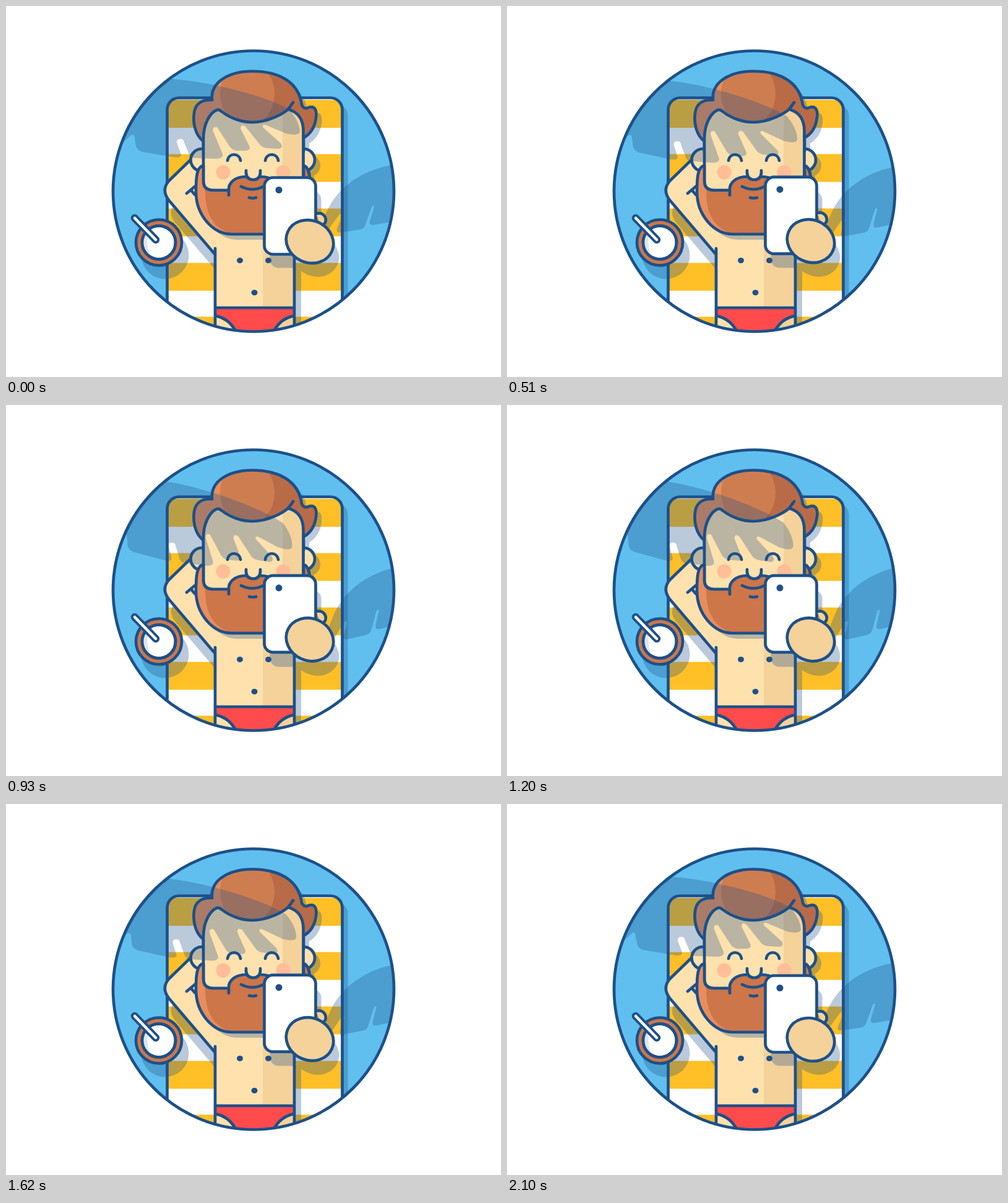
Write an HTML page that moves like this. It is 800 px wide and 600 px high and loops after 2130 ms.

```html
<!DOCTYPE html>
<html lang="en">
<head>
<meta charset="utf-8">
<title>Sunbathing selfie</title>
<style>
  html, body { margin: 0; width: 100%; height: 100%; overflow: hidden; background: #fff; }
  svg { display: block; width: 800px; height: 600px; }
  .line { fill: none; stroke: #1d5089; stroke-width: 4.7; stroke-linecap: round; stroke-linejoin: round; }
  .ink { fill: #1d5089; }
  .shade { fill: #1d5089; opacity: .3; }
  .skin { fill: #fee1ad; }
  .tan { fill: #f4d29a; }
</style>
</head>
<body>
<svg viewBox="0 0 800 600">
  <defs>
    <circle id="disc" cx="400" cy="299.500" r="227"/>
    <rect id="towel" x="260.500" y="148.500" width="283" height="440" rx="19"/>
    <path id="arm" d="M299 248L264 282Q250 297 263 314L338 402V360L310 250Z"/>
    <path id="torso" d="M338 345H466V540H338Z"/>
    <path id="hair" d="M333 152C330 123 360 105.500 398 105.500C440 105.500 473 122 478 160Q482 168 489 164C501 161 503 171 500.500 184C498 198 490 208 481 213V235H319V219C305 208 302 188 304 173C306 157 318 151 333 152Z"/>
    <path id="face" d="M319 283V215C319 190 330 172 341 168Q345 167 349 171C362 181 380 188 398 188C424 188 448 174 456 167Q480.500 174 480.500 202V283Q480 298 465 298H335Q319 298 319 283Z"/>
    <path id="beard" d="M319 258C308 260 307 278 307 300C307 338 334 369 365 369H435C466 369 492 338 492 300C492 276 490 260 481 258V283Q481 298 465 298H441C440 284 428 276 411 276H388C370 276 359 286 360 298H335Q319 298 319 283Z"/>
    <g id="ears"><circle cx="316.500" cy="249" r="18"/><circle cx="481" cy="249" r="18"/></g>
    <rect id="phone" x="417.500" y="277.500" width="83" height="124" rx="14"/>
    <ellipse id="hand" cx="491" cy="381" rx="39" ry="34" transform="rotate(24 491 381)"/>
    <g id="cast">
      <use href="#hair" x="9" y="9"/><use href="#beard" x="9" y="9"/><use href="#ears" x="9" y="9"/>
      <use href="#phone" x="9" y="22"/><use href="#hand" x="9" y="22"/>
    </g>
    <clipPath id="inDisc"><use href="#disc"/></clipPath>
    <clipPath id="inTowel"><use href="#towel"/></clipPath>
    <clipPath id="inTorso"><use href="#torso"/></clipPath>
    <clipPath id="inFace"><use href="#face"/></clipPath>
    <clipPath id="inHair"><use href="#hair"/></clipPath>
    <clipPath id="inBeard"><use href="#beard"/></clipPath>
    <clipPath id="inCup"><circle cx="247" cy="382.500" r="27"/></clipPath>
  </defs>

  <use href="#disc" fill="#60bfee"/>
  <g clip-path="url(#inDisc)">
    <!-- towel -->
    <use href="#towel" class="shade" x="9" y="10"/>
    <g clip-path="url(#inTowel)">
      <path fill="#fff" d="M250 140H560V540H250Z"/>
      <path stroke="#ffbf26" stroke-width="45" d="M250 174.500H560M250 262H560M250 350H560M250 438H560M250 525H560"/>
    </g>
    <use href="#towel" class="line"/>
    <g class="shade">
      <use href="#cast"/>
      <use href="#arm" x="10" y="36"/>
      <path d="M466 400H477V540H466Z"/>
      <circle cx="257" cy="403" r="38.500"/>
    </g>

    <!-- body -->
    <use href="#torso" class="skin"/>
    <g clip-path="url(#inTorso)">
      <path class="tan" d="M415 340H470V540H415Z"/>
      <use href="#cast" class="shade"/>
      <path fill="#ff4b4b" d="M338 488H466V540H338Z"/>
      <g class="line">
        <path class="skin" d="M330 500Q362 502 374 532H330Z"/>
        <path class="tan" d="M474 500Q442 502 430 532H474Z"/>
        <path d="M338 488H466"/>
      </g>
    </g>
    <use href="#arm" class="skin"/>
    <path class="line" d="M299 248L264 282Q250 297 263 314L338 402M338 392V540M466 392V540M292 303L305 292M299 298L305 305"/>
    <g class="ink">
      <ellipse cx="378" cy="411.500" rx="5" ry="4.500"/>
      <ellipse cx="424" cy="411.500" rx="5" ry="4.500"/>
      <ellipse cx="401.500" cy="463.500" rx="5" ry="4.500"/>
    </g>

    <!-- head -->
    <use href="#ears" class="skin"/>
    <use href="#ears" class="line"/>
    <g clip-path="url(#inHair)">
      <path fill="#b96b47" d="M390 90H510V240H390Z"/>
      <path fill="#e88d5c" d="M290 90H390V240H290Z"/>
      <ellipse cx="390" cy="142" rx="44" ry="52" fill="#ce7d50"/>
    </g>
    <use href="#hair" class="line"/>
    <use href="#face" class="skin"/>
    <path class="tan" clip-path="url(#inFace)" d="M447 150H490V310H447Z"/>
    <g fill="#ffbd98"><circle cx="351" cy="269" r="11.500"/><circle cx="448" cy="269" r="11.500"/></g>
    <use href="#face" class="line"/>
    <g clip-path="url(#inBeard)">
      <path fill="#e88d5c" d="M300 250H500V380H300Z"/>
      <path fill="#cc764a" d="M322 250V300C322 345 342 366 378 372H500V250Z"/>
    </g>
    <use href="#beard" class="line"/>
    <path class="skin" d="M385 262H414L411 271Q409 281 399.500 281Q390 281 388 271Z"/>
    <path class="line" d="M388 266V270Q389 281 399.500 281Q410 281 411 270V266M360 298V306M380 292Q398 301 416 292M393 310Q398.500 311.500 404 310M358 250C360 237 377 237 379 250M419 250C421 237 438 237 440 250M456 167L464 156"/>

    <!-- drink -->
    <circle class="line" cx="247" cy="382.500" r="37" style="fill:#cb774c"/>
    <circle class="line" cx="247" cy="382.500" r="27" style="fill:#fff"/>
    <path clip-path="url(#inCup)" fill="#dfe5ee" d="M215 350H236Q220 384 238 412H215Z"/>
    <circle class="line" cx="247" cy="382.500" r="27"/>
    <path class="line" d="M208 343L242 378" style="stroke-width:12.500"/>
    <path d="M208 343L242 378" stroke="#fff" stroke-width="4.500" stroke-linecap="round"/>

    <!-- palm shadows -->
    <path id="leftLeaf" class="shade" d="M130 250L188 222L202 209Q207 206 208 213L210 226Q212 234 221 236L268 244Q284 247 283 240L276 221Q275 214 284 215Q287 216 288 221L296 240Q299 246 306 246L340 247Q352 246 350 239L335 203Q333 194 341 196L362 228Q368 235 376 234L388 234Q396 233 393 226L379 198Q380 190 387 195L411 225Q416 230 424 230L440 231Q449 230 444 222L415 196Q414 190 421 193L452 206Q474 211 475 203Q474 185 456 166C420 146 330 122 268 118L230 116L130 120Z"/>
    <path id="rightLeaf" class="shade" d="M700 245L627 257C590 262 545 282 522 325Q507 354 505 366Q515 368 522 360L538 338Q542 334 543 340L535 360Q533 367 541 366L570 362Q579 361 581 353L591 325Q594 320 595 325L588 348Q587 355 594 354L618 350L700 330Z"/>
  </g>
  <use href="#disc" class="line"/>

  <g id="selfie">
    <use href="#phone" fill="#fff"/>
    <use href="#phone" class="line"/>
    <circle class="ink" cx="441" cy="297.500" r="5.500"/>
    <path class="line" d="M501 336C512 332 519 342 516 350Q514 354 510 356" style="fill:#f4d29a"/>
    <use href="#hand" class="tan"/>
    <use href="#hand" class="line"/>
  </g>
</svg>
<script>
  const LOOP = 2130;
  const move = (id, value) => document.getElementById(id).setAttribute("transform", value);

  function draw(now) {
    const sway = (1 - Math.cos(now / LOOP * 2 * Math.PI)) / 2;
    move("leftLeaf", `rotate(${5.7 * sway} 195 85)`);
    move("rightLeaf", `rotate(${-4.9 * sway} 700 240)`);
    move("selfie", `translate(0 ${-1.7 * sway})`);
  }

  let start;
  function tick(now) {
    start ??= now;
    draw(now - start);
    requestAnimationFrame(tick);
  }
  draw(0);
  requestAnimationFrame(tick);
</script>
</body>
</html>
```
